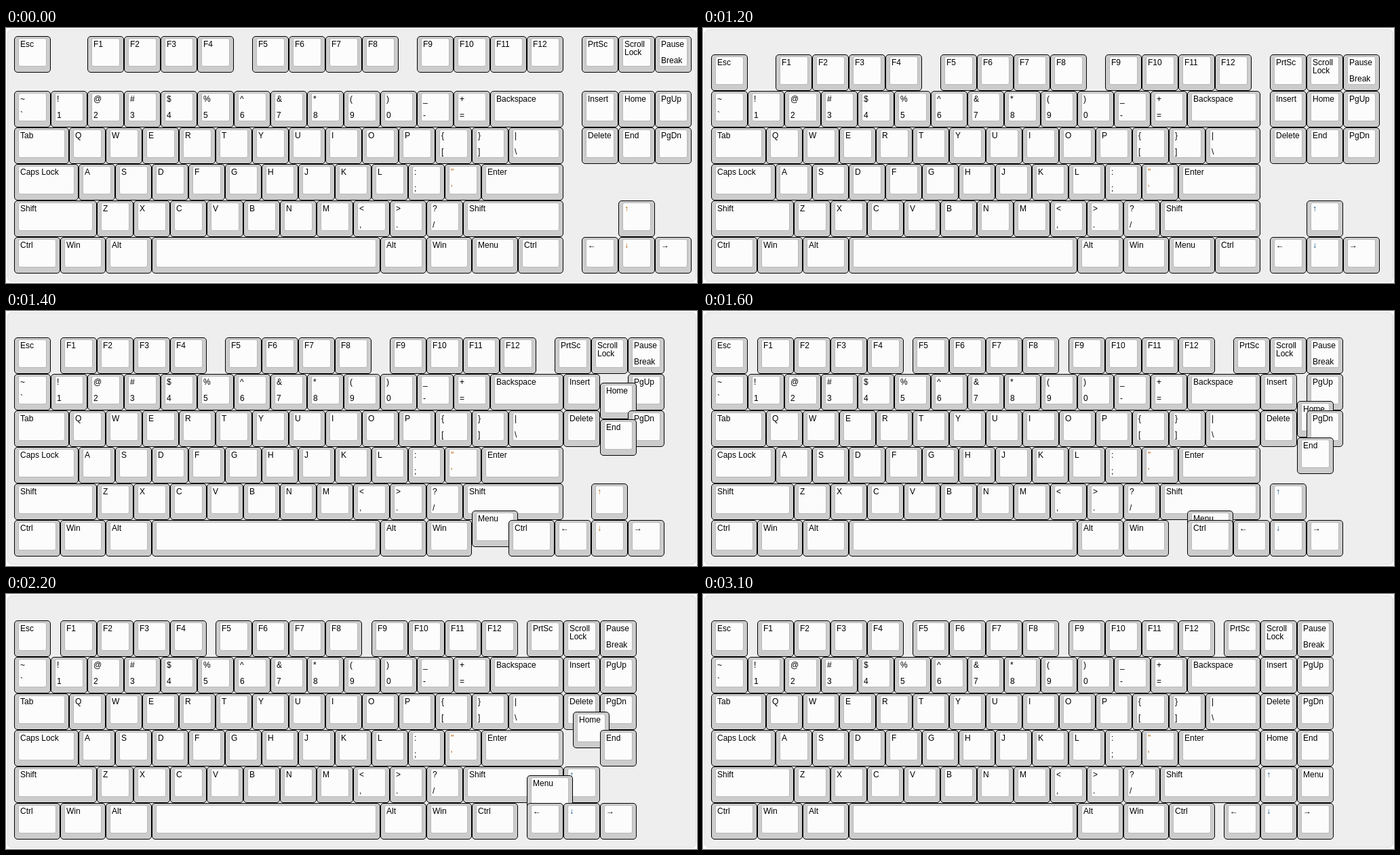
These frames come from a looping animation (1019 by 377 pixels, 6100 ms). An HTML page:

```html
<!DOCTYPE html>
<html lang="en">
<head>
<meta charset="utf-8">
<title>Compacting a keyboard</title>
<style>
  html, body { margin: 0; width: 100%; height: 100%; overflow: hidden; background: #fff; }
  #board {
    position: absolute; left: 2px; top: 2px; width: 1016px; height: 373px;
    box-sizing: border-box; border: 1px solid #ddd; border-radius: 6px; background: #eee;
  }
  #keys { position: absolute; left: 0; top: 0; }
  .key {
    position: absolute; left: 0; top: 0; height: 54px; box-sizing: border-box;
    border: 1px solid #000; border-radius: 5px; background: #ccc;
    font: 12px/12px "Liberation Sans", Arial, sans-serif; color: #000;
  }
  .cap {
    position: absolute; left: 5px; right: 5px; top: 2px; height: 42px;
    box-sizing: border-box; border: 1px solid #b8b8b8; border-radius: 3px; background: #fcfcfc;
  }
  .label { position: absolute; left: 8px; white-space: pre; }
  .upper { top: 5px; }
  .lower { top: 29px; }
</style>
</head>
<body>
<div id="board"></div>
<div id="keys"></div>
<script>
const UNIT = 54, ORIGIN = 12;
const LOOP = 6100, HOLD = 1000, TICK = 100, LAST = 22;
const ORANGE = '#b85c00', BLUE = '#00487f';

// One letter per tick, each a quarter unit; a dot waits.
const DIRS = { L: [-1, 0], R: [1, 0], U: [0, -1], D: [0, 1], '.': [0, 0] };
const DROP = 'DD';
const LEFT2 = '..LL';
const LEFT6 = '..LLLLLL';
const HOME = '..LLDDDDLDLDLDLD';
const END = '..LLDDDD';
const CTRL = '....LLLLL';
const MENU = '....URRRURRRURRRURRRRR';

const layer = document.getElementById('keys');
const keys = [];

function addLabel(parent, cls, text) {
  const el = document.createElement('div');
  el.className = 'label ' + cls;
  el.textContent = text;
  parent.append(el);
}

function addKey(x, y, legend, w = 1, moves = '') {
  const el = document.createElement('div');
  el.className = 'key';
  const cap = document.createElement('div');
  cap.className = 'cap';
  el.append(cap);
  const [upper, lower] = Array.isArray(legend) ? legend : [legend];
  addLabel(el, 'upper', upper);
  if (lower) addLabel(el, 'lower', lower);
  if (upper === '"') el.style.color = ORANGE;
  layer.append(el);
  keys.push({ el, x, y, w, moves, tinted: upper === '↑' || upper === '↓', menu: upper === 'Menu' });
}

// Items are a legend, or [legend, width, moves].
function addRow(x, y, items, moves = '') {
  for (const item of items) {
    const [legend, w = 1, own = moves] = Array.isArray(item) ? item : [item];
    addKey(x, y, legend, w, own);
    x += w;
  }
}

const pairs = text => text.split(' ').map(p => [[...p]]);
const letters = text => [...text];

addKey(0, 0, 'Esc', 1, DROP);
addRow(2, 0, ['F1', 'F2', 'F3', 'F4'], DROP + 'LLL');
addRow(6.5, 0, ['F5', 'F6', 'F7', 'F8'], DROP + 'LLLL');
addRow(11, 0, ['F9', 'F10', 'F11', 'F12'], DROP + 'LLLLL');
addRow(15.5, 0, ['PrtSc', 'Scroll\nLock', [['Pause', 'Break']]], DROP + 'LLLLLL');

addRow(0, 1.5, [...pairs('~` !1 @2 #3 $4 %5 ^6 &7 *8 (9 )0 _- +='), ['Backspace', 2]]);
addRow(15.5, 1.5, [['Insert', 1, LEFT2], ['Home', 1, HOME], ['PgUp', 1, LEFT6]]);

addRow(0, 2.5, [['Tab', 1.5], ...letters('QWERTYUIOP'), ...pairs('{[ }]'), [['|', '\\'], 1.5]]);
addRow(15.5, 2.5, [['Delete', 1, LEFT2], ['End', 1, END], ['PgDn', 1, LEFT6]]);

addRow(0, 3.5, [['Caps Lock', 1.75], ...letters('ASDFGHJKL'), ...pairs(':; "\''), ['Enter', 2.25]]);

addRow(0, 4.5, [['Shift', 2.25], ...letters('ZXCVBNM'), ...pairs('<, >. ?/'), ['Shift', 2.75]]);
addKey(16.5, 4.5, '↑', 1, LEFT6);

addRow(0, 5.5, [
  ['Ctrl', 1.25], ['Win', 1.25], ['Alt', 1.25], ['', 6.25],
  ['Alt', 1.25], ['Win', 1.25], ['Menu', 1.25, MENU], ['Ctrl', 1.25, CTRL]
]);
addRow(15.5, 5.5, ['←', '↓', '→'], LEFT6);

function place(key, step) {
  let { x, y, w } = key;
  for (const m of key.moves.slice(0, step)) {
    x += DIRS[m][0] / 4;
    y += DIRS[m][1] / 4;
  }
  if (key.menu && step === LAST) w = 1;
  const left = Math.round(ORIGIN + x * UNIT);
  const right = Math.round(ORIGIN + (x + w) * UNIT);
  const top = Math.floor(ORIGIN + y * UNIT);
  const style = key.el.style;
  style.left = left + 'px';
  style.top = top + 'px';
  style.width = right - left + 'px';
  style.zIndex = top * 2000 + left; // lower keys, then keys further right, lie on top
  if (key.tinted) style.color = left % 2 ? ORANGE : BLUE;
}

let shown = -1;
function draw(step) {
  if (step === shown) return;
  shown = step;
  for (const key of keys) place(key, step);
}

const start = performance.now();
function frame() {
  const t = (performance.now() - start) % LOOP;
  draw(t < HOLD ? 0 : Math.min(LAST, Math.floor((t - HOLD) / TICK) + 1));
  requestAnimationFrame(frame);
}
frame();
</script>
</body>
</html>
```
